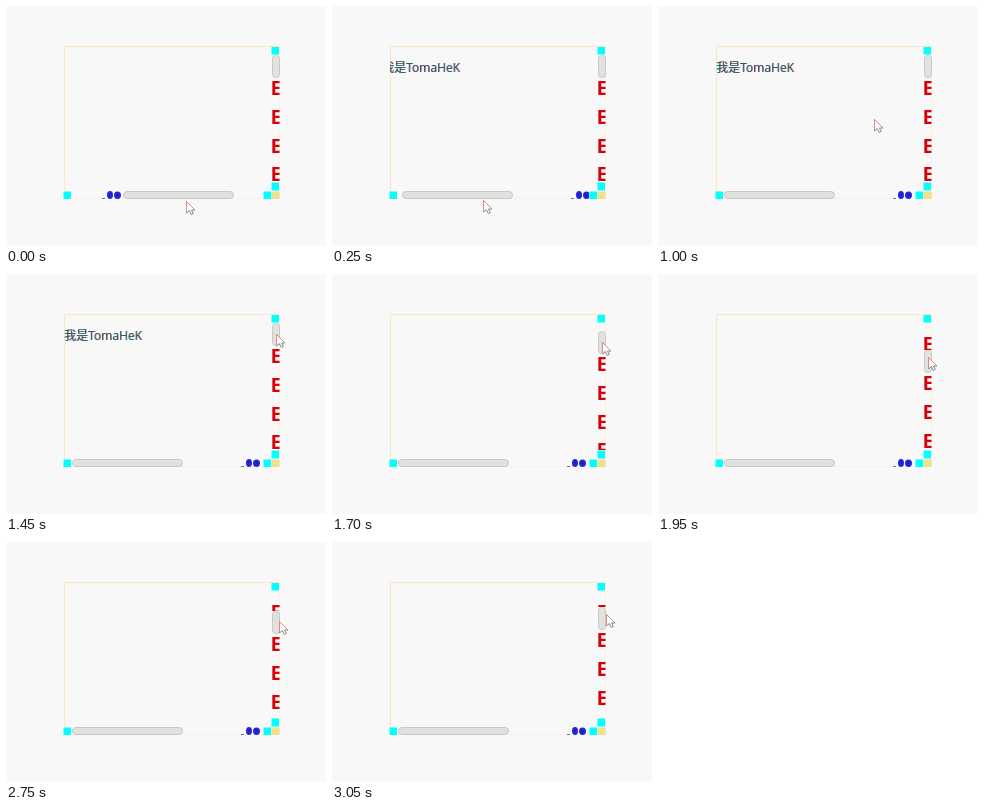
These frames come from a looping animation (320 by 240 pixels, 3100 ms). An HTML page:

```html
<!DOCTYPE html>
<html lang="zh">
<head>
<meta charset="utf-8">
<title>Custom scrollbars</title>
<style>
html, body { margin: 0; width: 100%; height: 100%; overflow: hidden; background: #f8f8f8; }
svg { display: block; width: 320px; height: 240px; }
.label { font: 12px "Open Sans", "Noto Sans CJK SC", "Noto Sans CJK", sans-serif; fill: #08636c; text-shadow: .7px 0 rgba(235, 20, 40, .6); }
.mark { font: bold 20px "Liberation Sans", Arial, sans-serif; fill: #d4000c; }
.button { fill: #0ff; }
.thumb { fill: #e1e1df; stroke: #c8c8c8; }
</style>
</head>
<body>
<svg viewBox="0 0 320 240">
  <defs>
    <clipPath id="view"><rect x="58" y="41" width="207" height="144"/></clipPath>
    <clipPath id="trackX"><rect x="65" y="185" width="192" height="8"/></clipPath>
    <clipPath id="before"><rect id="beforeBox" x="265" y="49" width="8.500"/></clipPath>
    <clipPath id="after"><rect id="afterBox" x="265" width="8.500"/></clipPath>
    <g id="dots">
      <path d="M-1 192.5h3" stroke="#66c"/>
      <g fill="#2525d8">
        <ellipse cx="7" cy="189" rx="3" ry="4"/>
        <ellipse cx="14.5" cy="189.3" rx="3.5" ry="3.7"/>
      </g>
      <path d="M6 188h2M13 189h3" stroke="#1a1a80"/>
    </g>
  </defs>
  <path d="M273.500 41V192.500H58" fill="none" stroke="#fcf1e0"/>
  <path d="M58.500 193V40.500H274" fill="none" stroke="#fde5bf"/>
  <g clip-path="url(#view)"><text id="label" class="label">我是TomaHeK</text></g>
  <g clip-path="url(#trackX)">
    <use href="#dots" x="97"/>
    <use id="endDots" href="#dots"/>
  </g>
  <g clip-path="url(#before)"><text class="mark" x="265" y="77">E</text></g>
  <g clip-path="url(#after)"><g id="marks" class="mark"></g></g>
  <rect id="thumbX" class="thumb" y="185.5" width="110" height="7" rx="3.5"/>
  <rect id="thumbY" class="thumb" x="266.5" width="7" height="22" rx="3"/>
  <g class="button">
    <rect x="265.500" y="41" width="7.500" height="7.500"/>
    <rect x="265.500" y="176.500" width="7.500" height="8"/>
    <rect x="57.500" y="185.500" width="7.500" height="7.500"/>
    <rect x="257.500" y="185.500" width="7.500" height="7.500"/>
  </g>
  <rect x="265.500" y="185.500" width="8" height="7.500" fill="#f0e08c"/>
  <g id="cursor" fill="none">
    <path d="M.5 .5V12L3.300 9.500L5.300 13.500L7.300 12.500L5.500 9H9Z" fill="#fff" stroke="#7f8a8a"/>
    <path d="M8.500 8.500L.5 .5V11.500" stroke="#e08a82"/>
  </g>
</svg>
<script>
const LOOP = 3100, STEP = 50, LEFT = 66, TOP = 49, THUMB = 23, GAP = 28.8;
const $ = id => document.getElementById(id);

// Turning points: [ms, ...values]
const dragX = [[0, 117], [250, 70], [650, 78], [850, LEFT]];
const dragY = [[1500, TOP], [2100, 81], [3050, 65]];
const pointer = [
  [0, 180, 195], [400, 138, 194], [650, 144, 196], [850, 132, 195],
  [1125, 280, 50], [1450, 270, 60], [2250, 270, 94], [3050, 274, 72]
];

// Eases between neighbouring turning points and holds the end values
function at(keys, t) {
  const i = keys.findIndex(key => key[0] > t);
  const [t1, ...to] = keys.at(i);
  if (i < 1) return to;
  const [t0, ...from] = keys[i - 1];
  const u = (t - t0) / (t1 - t0), ease = u * u * (3 - 2 * u);
  return from.map((v, n) => Math.round(v + (to[n] - v) * ease));
}

function set(id, attrs) {
  for (const name in attrs) $(id).setAttribute(name, attrs[name]);
}
const move = (id, x, y) => set(id, { transform: `translate(${x} ${y})` });

for (let i = 0; i < 5; i++)
  $("marks").innerHTML += `<text x="265" y="${17 + GAP * i}">E</text>`;

function draw(now) {
  const t = Math.floor(now % LOOP / STEP) * STEP;
  const [x] = at(dragX, t), [y] = at(dragY, t), end = y + THUMB;
  set("thumbX", { x: x + .5 });
  set("thumbY", { y: y + .5 });
  set("label", { x: 58 - 2 * (x - LEFT), y: 66 - 6 * (y - TOP) });
  set("endDots", { x: x + 170 });
  set("beforeBox", { height: y - TOP });
  set("afterBox", { y: end, height: 176 - end });
  move("marks", 0, end);
  move("cursor", ...at(pointer, t));
}

let start;
function tick(now) {
  start ??= now;
  draw(now - start);
  requestAnimationFrame(tick);
}
draw(0);
requestAnimationFrame(tick);
</script>
</body>
</html>
```
